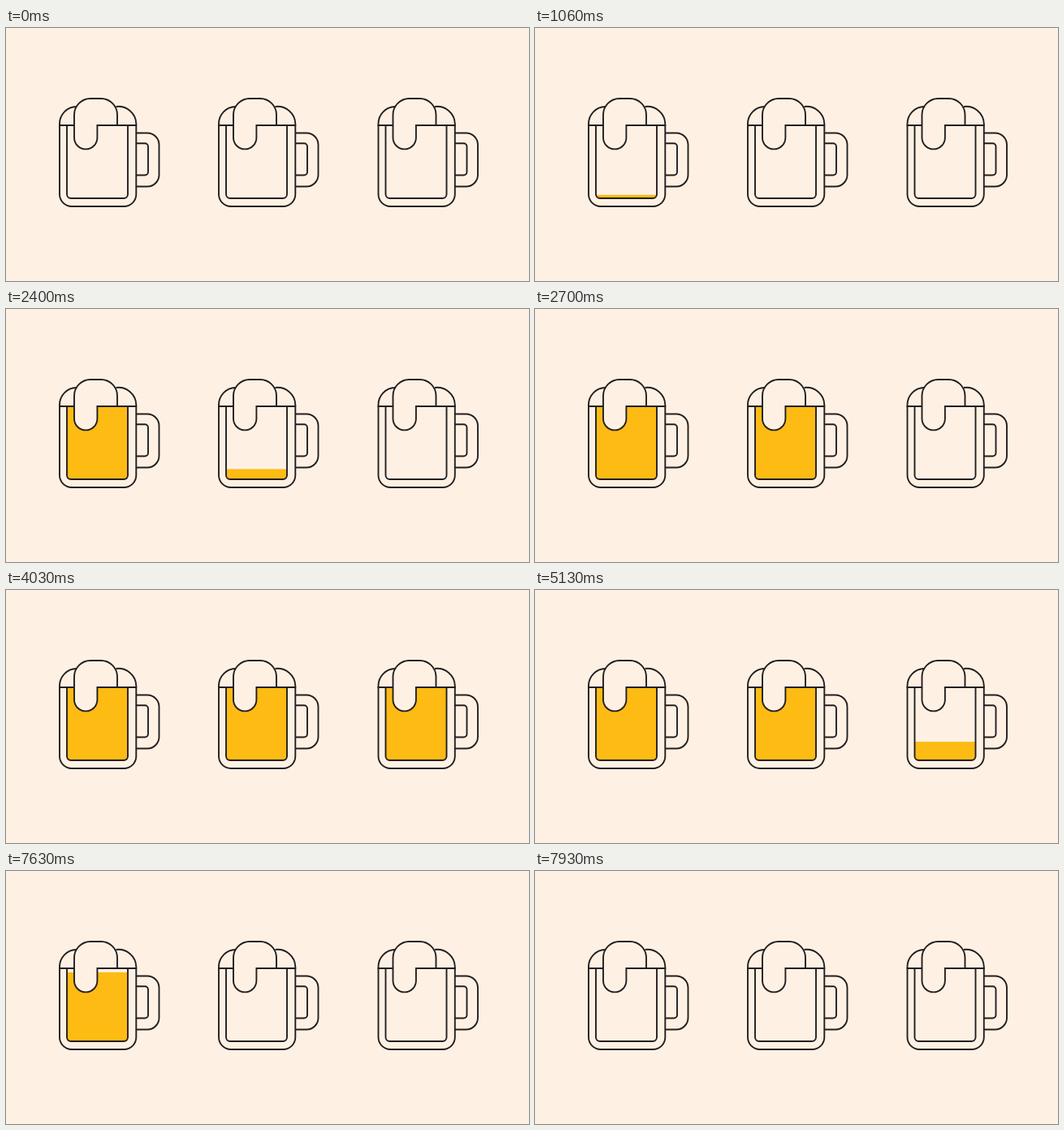
An HTML page for the animation above (8100 ms loop, 644 px wide and 312 px high).

```html
<!DOCTYPE html>
<html lang="en">
<head>
<meta charset="utf-8">
<title>Three mugs</title>
<style>
  html, body { margin: 0; width: 100%; height: 100%; overflow: hidden; background: #fef1e4; }
  svg { display: block; width: 644px; height: 312px; }
  .line { fill: none; stroke: #231f20; stroke-width: 1.9; stroke-linejoin: miter; }
  .foam { fill: #fef1e4; }
  .beer { fill: #fdbb14; }
</style>
</head>
<body>
<svg viewBox="0 0 644 312">
  <defs>
    <clipPath id="glass">
      <path d="M75 120H150V205a5 5 0 0 1 -5 5H80a5 5 0 0 1 -5 -5Z"/>
    </clipPath>
    <g id="mug">
      <path class="foam" d="M84 120V135.2a14.2 14.2 0 0 0 28.4 0V120Z"/>
      <g class="line">
        <path d="M75 120V205a5 5 0 0 0 5 5H145a5 5 0 0 0 5 -5V120"/>
        <path d="M66 120V205a15 15 0 0 0 15 15H145.3a15 15 0 0 0 15 -15V120"/>
        <path d="M66 120V118A21 21 0 0 1 86.5 97M135.5 97A22 22 0 0 1 160.3 118V120"/>
        <path d="M65.1 120H84M137 120V107a20 20 0 0 0 -20 -20H104a20 20 0 0 0 -20 20V135.2a14.2 14.2 0 0 0 28.4 0V120H161.2"/>
        <path d="M160.3 129.5H174a14.5 14.5 0 0 1 14.5 14.5V181a14.5 14.5 0 0 1 -14.5 14.5H160.3"/>
        <path d="M160.3 142.3H171a4 4 0 0 1 4 4V177.5a4 4 0 0 1 -4 4H160.3"/>
      </g>
    </g>
  </defs>
</svg>
<script>
const NS = 'http://www.w3.org/2000/svg';
const LOOP = 8100, TOP = 120, BOTTOM = 210;

const smooth = u => { const v = u ** 0.85; return v * v * (3 - 2 * v); };
const easeOut = u => 1 - (1 - u) ** 3.2;

// Times are in ticks of 1/30 s: [start, end, easing]
const mugs = [
  { x: 0,     fill: [31, 42, smooth],   drain: [228, 238, smooth] },
  { x: 196,   fill: [70, 81, smooth],   drain: [189, 200, easeOut] },
  { x: 392.5, fill: [111, 121, smooth], drain: [149, 157, smooth] }
];

function add(parent, name, attrs) {
  const el = document.createElementNS(NS, name);
  for (const key in attrs) el.setAttribute(key, attrs[key]);
  return parent.appendChild(el);
}

const svg = document.querySelector('svg');
for (const mug of mugs) {
  const group = add(svg, 'g', { transform: `translate(${mug.x} 0)` });
  const clip = add(group, 'g', { 'clip-path': 'url(#glass)' });
  mug.beer = add(clip, 'rect', { class: 'beer', x: 75, y: BOTTOM, width: 75, height: 0 });
  add(group, 'use', { href: '#mug' });
}

function progress(tick, [start, end, ease]) {
  return ease(Math.min(1, Math.max(0, (tick - start) / (end - start))));
}

function draw() {
  const t = performance.now() % LOOP;
  const tick = Math.floor((Math.floor(t / 10) * 10 + 7) * 0.03);
  for (const { beer, fill, drain } of mugs) {
    const height = (BOTTOM - TOP) * (progress(tick, fill) - progress(tick, drain));
    beer.setAttribute('y', BOTTOM - height);
    beer.setAttribute('height', height);
  }
  requestAnimationFrame(draw);
}
draw();
</script>
</body>
</html>
```
